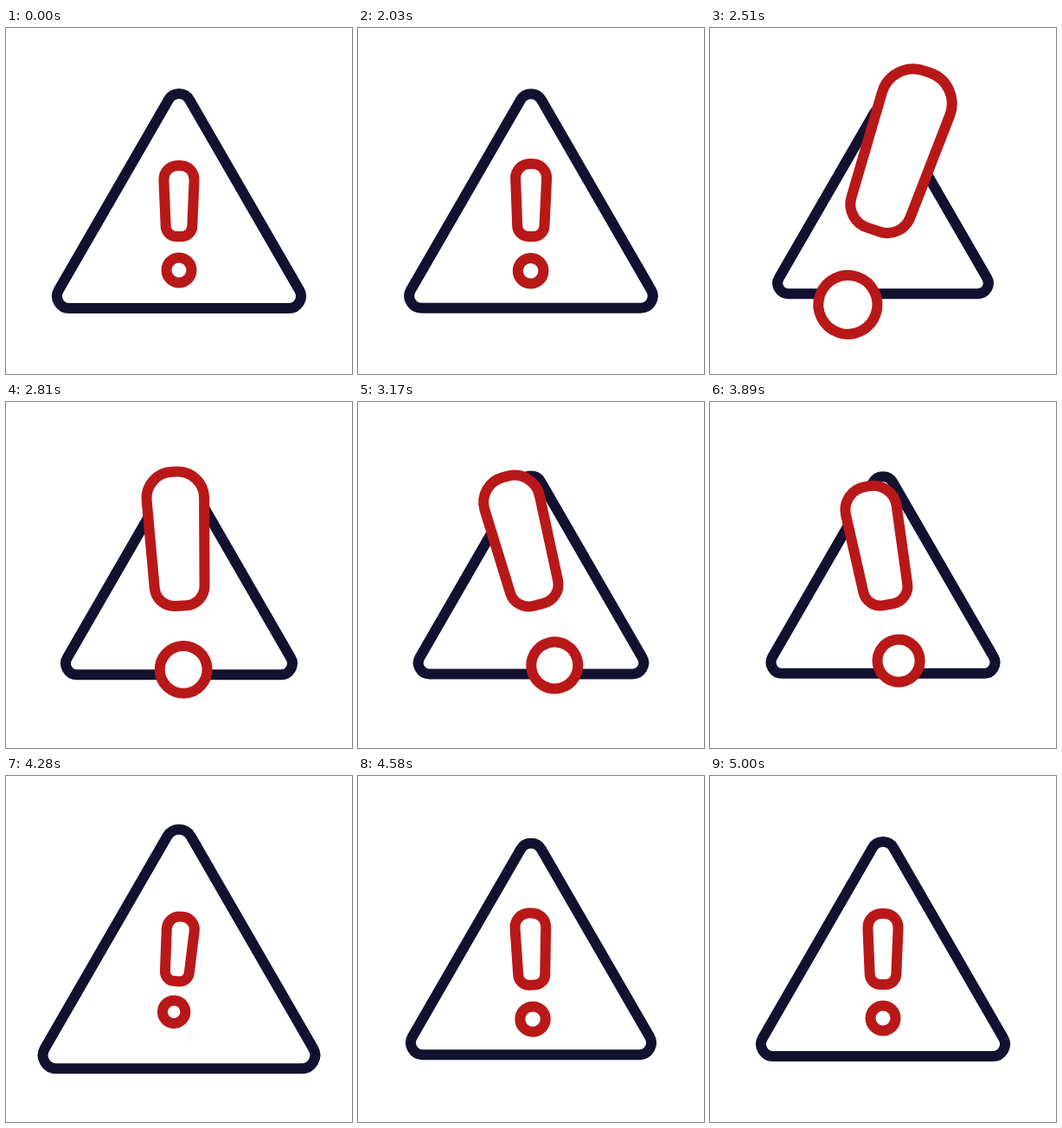
These frames come from a looping animation (400x400 px, 5.03 s). An HTML page with a canvas:

```html
<!DOCTYPE html>
<html lang="en">
<head>
<meta charset="utf-8">
<title>Warning sign</title>
<style>
  html, body { margin: 0; width: 100%; height: 100%; overflow: hidden; background: #fff; }
  canvas { display: block; width: 100%; height: 100%; }
</style>
</head>
<body>
<canvas id="stage" width="400" height="400"></canvas>
<script>
const ctx = document.getElementById('stage').getContext('2d');
const LOOP = 5030, HOLD = 2030, STEP = 30;
const NAVY = '#121230', RED = '#b91818';

// Tracks are [ms since the move began, value], eased between keys.
const tracks = {
  triangle: [[0, 1], [440, .86], [960, .946], [1710, .83], [2210, 1.128], [2600, .985], [3000, 1]],
  size: [[0, 1], [400, 2.41], [1000, 1.73], [1600, 2.41], [2200, .9], [2600, 1.015], [3000, 1]],
  lift: [[0, 0], [400, -64], [1000, -35], [1600, -66], [2200, 0], [3000, 0]],
  tilt: [[0, 0], [440, 20], [1040, -13.8], [1650, -21], [2200, 5.3], [2600, -1.5], [3000, 0]]
};

function valueAt(track, t) {
  for (let i = 1; i < track.length; i++) {
    const [t0, a] = track[i - 1], [t1, b] = track[i];
    if (t <= t1) {
      const x = (t - t0) / (t1 - t0);
      return a + (b - a) * x * x * (3 - 2 * x);
    }
  }
  return track[track.length - 1][1];
}

// Closed polygon with rounded corners: [x, y, radius].
function roundPoly(points, k) {
  const [x0, y0] = points[0], [xn, yn] = points[points.length - 1];
  ctx.beginPath();
  ctx.moveTo((x0 + xn) / 2 * k, (y0 + yn) / 2 * k);
  points.forEach(([x, y, r], i) => {
    const [nx, ny] = points[(i + 1) % points.length];
    ctx.arcTo(x * k, y * k, nx * k, ny * k, r * k);
  });
  ctx.closePath();
}

function paint(color) {
  ctx.fillStyle = '#fff';
  ctx.strokeStyle = color;
  ctx.lineWidth = 12;
  ctx.fill();
  ctx.stroke();
}

const half = 127 + 14 * Math.sqrt(3);
const triangle = [[0, -138, 14], [half, 124, 14], [-half, 124, 14]];
const bar = [[-18.3, -41, 16], [18.3, -41, 16], [14.8, 41, 12], [-14.8, 41, 12]];

function draw(t) {
  ctx.setTransform(1, 0, 0, 1, 0, 0);
  ctx.fillStyle = '#fff';
  ctx.fillRect(0, 0, 400, 400);
  ctx.translate(200, 200);

  roundPoly(triangle, valueAt(tracks.triangle, t));
  paint(NAVY);

  const size = valueAt(tracks.size, t);
  ctx.rotate(valueAt(tracks.tilt, t) * Math.PI / 180);
  ctx.translate(0, valueAt(tracks.lift, t));
  roundPoly(bar, size);
  paint(RED);
  ctx.beginPath();
  ctx.arc(0, 80 * size, 14.5 * size, 0, Math.PI * 2);
  paint(RED);
}

const start = performance.now();
function tick() {
  const t = (performance.now() - start) % LOOP;
  draw(t < HOLD ? 0 : (Math.floor((t - HOLD) / STEP) + 1) * STEP);
  requestAnimationFrame(tick);
}
tick();
</script>
</body>
</html>
```
